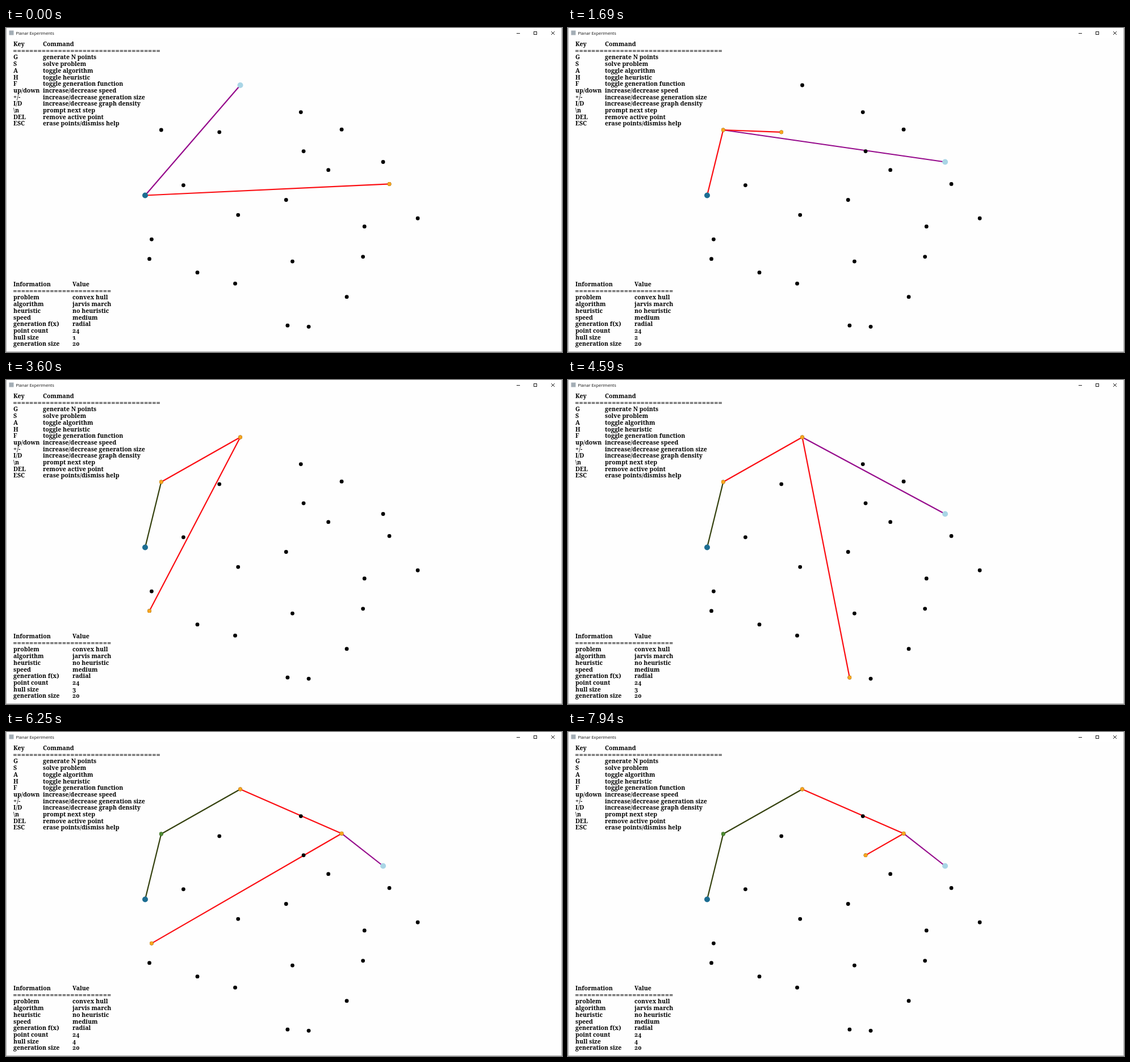
An HTML page with a canvas that plays this animation: 979x572 px, repeating every 8 s.

```html
<!DOCTYPE html>
<html lang="en">
<head>
<meta charset="utf-8">
<title>Planar Experiments</title>
<style>
  html, body { margin: 0; width: 100%; height: 100%; overflow: hidden; background: #fefefe; }
  canvas, svg { position: absolute; left: 0; top: 0; }
  .table { font: bold 10.55px "Noto Serif", "Liberation Serif", serif; font-variant-numeric: oldstyle-nums; fill: #000; }
  .rule { font-size: 12.9px; }
  .title { font: 7.4px "Open Sans", sans-serif; fill: #111; }
</style>
</head>
<body>
<canvas id="stage" width="979" height="572"></canvas>
<svg id="labels" width="979" height="572"></svg>
<script>
const LOOP = 8000;
const ctx = document.getElementById('stage').getContext('2d');
const labels = document.getElementById('labels');

const P = {
  S: [245, 295.5], B: [273.3, 180], C: [412.5, 101], D: [519.2, 148.6], E: [591, 179.2],
  F: [375.7, 183.8], G: [524, 217.6], H: [567.6, 250.7], I: [664, 236.5], J: [675, 275.4],
  K: [312.4, 277.6], L: [493.2, 303.5], M: [408.7, 330.1], N: [725, 336], O: [631.2, 350.4],
  P: [628.6, 403.8], Q: [504.4, 412.1], R: [256.4, 373.1], T: [252.5, 407.7], U: [337, 431.7],
  V: [403.5, 451.2], W: [600, 474.7], X: [495.8, 525.2], Y: [533, 527.3]
};

// Candidates tried from each hull point, in order.
const passes = [['S', 'CJBVGDO'], ['B', 'PTHIRUFCMQKWENJLYVGDHO'],
  ['C', 'TIRUFMQPXKWENJYVGDHO'], ['E', 'TIRUFMQPXKWNJBYLVG']];

// Runs of evenly spaced steps: first, last, count.
const runs = [[0, 0, 2], [240, 240, 1], [530, 890, 4], [1000, 1120, 2], [1240, 1330, 2],
  [1450, 2170, 7], [2290, 2410, 2], [2550, 2670, 2], [2790, 3240, 5], [3360, 3600, 3],
  [3750, 4470, 7], [4590, 5280, 7], [5400, 6000, 6], [6150, 6150, 1], [6150, 6850, 7],
  [6970, 7700, 7], [7820, 7940, 2]];
const times = runs.flatMap(([a, b, n]) =>
  Array.from({ length: n }, (_, i) => Math.round(a + (n > 1 ? (b - a) * i / (n - 1) : 0))));

function turnsLeft(cur, best, next) {
  const [x, y] = P[cur], [bx, by] = P[best], [nx, ny] = P[next];
  return (bx - x) * (ny - y) - (by - y) * (nx - x) < 0;
}

const steps = [];
passes.forEach(([cur, order], k) => {
  const hull = passes.slice(0, k + 1).map(p => p[0]);
  let best = null;
  for (const next of order) {
    steps.push({ at: times[steps.length], hull, best, next });
    if (!best || turnsLeft(cur, best, next)) best = next;
  }
});

function line(a, b, color) {
  ctx.strokeStyle = color;
  ctx.lineWidth = 2.2;
  ctx.beginPath();
  ctx.moveTo(...P[a]);
  ctx.lineTo(...P[b]);
  ctx.stroke();
}

function dot(id, color, r = 3.4) {
  ctx.fillStyle = color;
  ctx.beginPath();
  ctx.arc(...P[id], r, 0, 7);
  ctx.fill();
}

function drawWindow() {
  ctx.fillStyle = '#fefefe';
  ctx.fillRect(0, 0, 979, 572);
  ctx.fillStyle = '#fff';
  ctx.fillRect(0, 0, 979, 18);
  ctx.fillStyle = '#a9a9a9';
  ctx.fillRect(0, 0, 1, 572);
  ctx.fillRect(978, 0, 1, 572);
  ctx.fillRect(0, 571, 979, 1);
  ctx.fillStyle = '#a3adb5';
  ctx.fillRect(5.5, 4.5, 8, 8);
  ctx.strokeStyle = '#222';
  ctx.lineWidth = 1;
  ctx.strokeRect(929.5, 6.5, 5, 5);
  ctx.beginPath();
  ctx.moveTo(899, 9.5); ctx.lineTo(905, 9.5);
  ctx.moveTo(960, 6); ctx.lineTo(966, 12);
  ctx.moveTo(966, 6); ctx.lineTo(960, 12);
  ctx.stroke();
}

function drawSearch({ hull, best, next }) {
  const last = hull.length - 1, cur = hull[last];
  for (let i = 0; i < last; i++) line(hull[i], hull[i + 1], i === last - 1 ? '#fb0d12' : '#35420f');
  if (best) line(cur, best, '#960b8c');
  line(cur, next, '#fb0d12');

  for (const id in P) dot(id, '#000');
  hull.forEach((id, i) => dot(id, i >= last - 1 ? '#f7a51f' : '#4d8b31'));
  if (best) dot(best, '#a9d5e6', 5);
  dot(next, '#f7a51f');
  dot('S', '#1c6d92', 5);
}

function text(str, x, y, cls = 'table') {
  const el = document.createElementNS('http://www.w3.org/2000/svg', 'text');
  el.setAttribute('x', x);
  el.setAttribute('y', y);
  el.setAttribute('class', cls);
  el.textContent = str;
  return labels.appendChild(el);
}

function table(rows, top, col, ruleLength) {
  return rows.map(([a, b], i) => {
    const y = top + 11.7 * (i ? i + 1 : 0);
    if (!i) text('='.repeat(ruleLength), 12.3, top + 12.6, 'table rule');
    text(a, 13, y);
    return text(b, col, y);
  });
}

text('Planar Experiments', 17.5, 11.7, 'title');
table([['Key', 'Command'], ['G', 'generate N points'], ['S', 'solve problem'],
  ['A', 'toggle algorithm'], ['H', 'toggle heuristic'], ['F', 'toggle generation function'],
  ['up/down', 'increase/decrease speed'], ['+/-', 'increase/decrease generation size'],
  ['I/D', 'increase/decrease graph density'], ['\\n', 'prompt next step'],
  ['DEL', 'remove active point'], ['ESC', 'erase points/dismiss help']], 32, 65, 36);
const info = table([['Information', 'Value'], ['problem', 'convex hull'], ['algorithm', 'jarvis march'],
  ['heuristic', 'no heuristic'], ['speed', 'medium'], ['generation f(x)', 'radial'],
  ['point count', '24'], ['hull size', '1'], ['generation size', '20']], 456, 117, 24);
const hullSize = info[7];

const start = performance.now();
function frame() {
  const t = (performance.now() - start) % LOOP;
  const step = steps.findLast(s => s.at <= t);
  drawWindow();
  drawSearch(step);
  hullSize.textContent = step.hull.length;
  requestAnimationFrame(frame);
}
frame();
</script>
</body>
</html>
```
